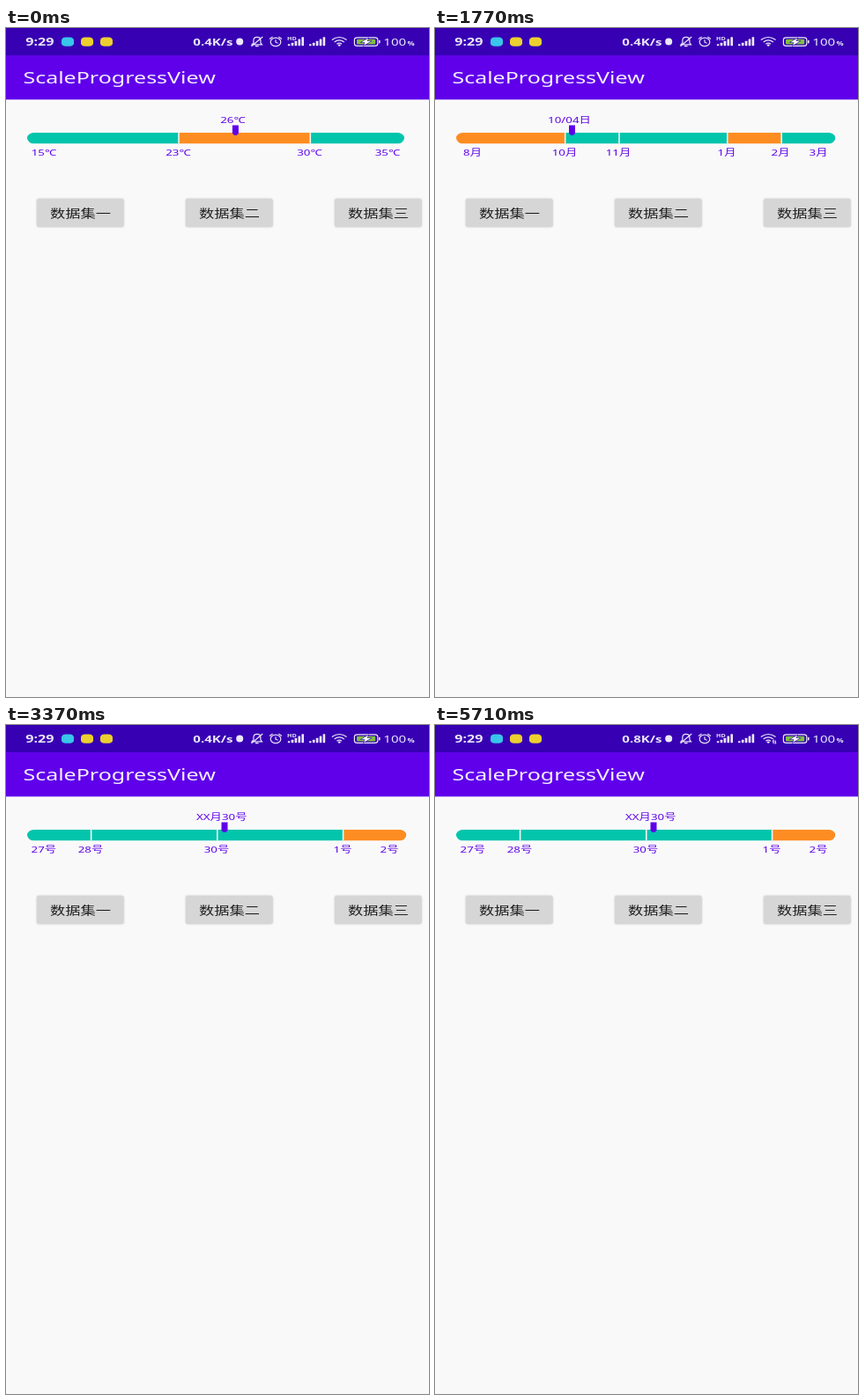
Animation of 480x760 px, one loop 5.75 s. Source, as an HTML page:

```html
<!DOCTYPE html>
<html lang="zh-CN">
<head>
<meta charset="utf-8">
<title>Scale progress</title>
<style>
  html, body { margin: 0; width: 100%; height: 100%; overflow: hidden; background: #f9f9fa; }
  svg { display: block; }
  text { font-family: "Noto Sans", "Noto Sans CJK SC", "Noto Sans CJK", sans-serif; }
  .line { fill: none; stroke: #e9e4f8; stroke-width: 1.2; }
</style>
</head>
<body>
<svg id="stage" width="480" height="760" viewBox="0 0 480 760"></svg>
<script>
const LOOP = 5750;
const SQUEEZE = 1.368; // the 1080 x 2340 phone screen is shown wider than tall
const TEAL = '#03c5ac', ORANGE = '#fd8d22', VIOLET = '#5f00e9', PALE = '#ece8fa';
const NAMES = ['一', '二', '三'];
const BUTTON = { x: [35, 204, 373], y: 194, w: 98.5, h: 32 };

const rect = (x, y, w, h, fill, extra = '') =>
  `<rect x="${x}" y="${y}" width="${w}" height="${h}" fill="${fill}" ${extra}/>`;
const text = (str, x, y, size, fill, anchor = 'middle', weight = 400, extra = '') =>
  `<text transform="translate(${x} ${y}) scale(${SQUEEZE} 1)" font-size="${size}" fill="${fill}"
    text-anchor="${anchor}" font-weight="${weight}" ${extra}>${str}</text>`;
const line = (d, extra = '') => `<path class="line" d="${d}" ${extra}/>`;

// Each scale: right end, inner ticks, segment colours, labels with centres, thumb and its caption
const SCALES = [
  { end: 452, ticks: [196, 345.3], fills: [TEAL, ORANGE, TEAL],
    labels: [['15℃', 43], ['23℃', 195.5], ['30℃', 344.5], ['35℃', 433]],
    thumb: 260.4, caption: '26℃', at: 257.5 },
  { end: 454.3, ticks: [147.7, 209, 331.8, 393.2], fills: [ORANGE, TEAL, TEAL, ORANGE, TEAL],
    labels: [['8月', 42.5], ['10月', 147], ['11月', 208], ['1月', 331], ['2月', 392], ['3月', 435]],
    thumb: 155.5, caption: '10/04日', at: 152.5 },
  { end: 454.3, ticks: [96.6, 239.8, 382.6], fills: [TEAL, TEAL, TEAL, ORANGE],
    labels: [['27号', 42.8], ['28号', 96], ['30号', 239], ['1号', 382], ['2号', 435]],
    thumb: 248, caption: 'XX月30号', at: 244.7 }
];

function drawScale(s, i) {
  const edges = [24, ...s.ticks, s.end];
  const bars = s.fills.map((f, k) => rect(edges[k], 118.7, edges[k + 1] - edges[k], 12.8, f)).join('');
  const ticks = s.ticks.map(x => rect(x - 0.8, 118.7, 1.6, 12.8, '#f4f4f6')).join('');
  const labels = s.labels.map(([str, x]) => text(str, x, 144.7, 9.75, VIOLET)).join('');
  return `<g class="scale">
    <clipPath id="bar${i}">${rect(24, 118.7, s.end - 24, 12.8, '#000', 'rx="8.6" ry="6.4"')}</clipPath>
    <g clip-path="url(#bar${i})">${bars}${ticks}</g>${labels}
    <path d="M${s.thumb - 3.5} 110.5h7v9.3l-2 2h-3l-2 -2z" fill="${VIOLET}"/>
    ${text(s.caption, s.at, 107.6, 9.75, VIOLET)}</g>`;
}

function drawButton(name, i) {
  const { y, w, h } = BUTTON, x = BUTTON.x[i];
  const box = (fill, extra) => rect(x, y, w, h, fill, `rx="2.4" ry="1.8" ${extra}`);
  return `<clipPath id="btn${i}">${box('#000', '')}</clipPath>
    ${box('#d6d6d7', 'class="face"')}
    <g clip-path="url(#btn${i})">${box('#000', 'class="tint" opacity="0"')}
    <ellipse class="ripple" cy="${y + h / 2}" opacity="0"/></g>
    ${text('数据集' + name, x + w / 2 + 0.3, 214.9, 12.6, '#1d1d1d', 'middle', 500)}`;
}

function signal(x) {
  return [2, 3.5, 5.5, 7.8, 10].map((h, k) => rect(x + k * 3.9, 20.2 - h, 2.6, h, PALE, 'rx=".6"')).join('');
}

function drawStatus() {
  const icons = [[63, '#38c6ea'], [85, '#ecd02f'], [107, '#ecd02f']]
    .map(([x, c]) => rect(x, 10.4, 14, 10.4, c, 'rx="4.6" ry="3.6"')).join('');
  return rect(0, 0, 480, 31, '#3700b3')
    + text('9:29', 22.3, 19.9, 11.8, PALE, 'start', 600) + icons
    + text('', 257.5, 19.8, 11, PALE, 'end', 600, 'id="speed"')
    + `<circle cx="265.2" cy="15.4" r="4" fill="${PALE}"/>`
    // muted bell
    + line('M279 18.8h11.5l-1.6 -2v-2.6c0 -5 -8 -5 -8 0v2.6zM283 20.6h3.6M278.5 20.8L291.3 10')
    // alarm clock
    + `<ellipse class="line" cx="306" cy="15.9" rx="5.8" ry="4.7"/>`
    + line('M306 13.2v3l2.6 1M299 12.4l3.6 -2.4M313 12.4l-3.6 -2.4')
    + signal(319.8) + rect(318.5, 9, 11, 5.4, '#3700b3')
    + text('HD', 319, 13.8, 5.2, PALE, 'start', 600)
    + signal(344)
    // wireless
    + line('M369.8 13.6Q378.2 7.4 386.6 13.6M372.6 16Q378.2 11.8 383.8 16M375.4 18.2Q378.2 16.2 381 18.2', 'stroke-width="1.6"')
    + `<ellipse cx="378.2" cy="19.6" rx="1.6" ry="1.1" fill="${PALE}"/>`
    + `<g id="traffic">${rect(382.5, 16.4, 6, 5, '#3700b3')}${line('M384 21v-3.4l-.9 1M386.2 17.4v3.4l.9 -1', 'stroke-width=".8"')}</g>`
    // battery
    + rect(395.4, 10.8, 26.4, 9.6, 'none', `rx="3.2" ry="2.4" stroke="${PALE}" stroke-width="1.2"`)
    + rect(398, 12.8, 21.2, 5.6, '#7fc241', 'rx="1"')
    + `<path d="M411 11.6l-7.6 4.6h4l-1.2 3.6l7.8 -4.8h-4.2z" fill="#fff" stroke="#3700b3" stroke-width="1.1" paint-order="stroke"/>`
    + rect(423, 13.8, 1.6, 3.6, PALE, 'rx=".7"')
    + text('100', 428.3, 19.9, 11, PALE, 'start', 500)
    + text('%', 455.4, 19.9, 6.6, PALE, 'start', 600);
}

const stage = document.getElementById('stage');
stage.innerHTML = rect(0, 0, 480, 760, '#f9f9fa') + drawStatus()
  + rect(0, 31, 480, 50.3, '#6000eb')
  + text('ScaleProgressView', 19.4, 63, 18.3, '#f6f0ff', 'start')
  + SCALES.map(drawScale).join('') + NAMES.map(drawButton).join('');

const all = sel => [...stage.querySelectorAll(sel)];
const scales = all('.scale'), faces = all('.face'), tints = all('.tint'), ripples = all('.ripple');
const speed = stage.querySelector('#speed'), traffic = stage.querySelector('#traffic');

const TAPS = [null, { down: 1070, up: 1270, x: 287 }, { down: 2590, up: 2770, x: 430 }];
const ramp = (t, start, length) => Math.min(1, Math.max(0, (t - start) / length));
const show = (el, on) => el.setAttribute('visibility', on ? 'visible' : 'hidden');

function press(t, tap, i) {
  const lift = tap ? ramp(t, tap.down, 100) - ramp(t, tap.up + 30, 110) : 0;
  faces[i].style.filter =
    `drop-shadow(0 ${0.7 + lift}px ${1 + 1.3 * lift}px rgba(0,0,0,${0.22 + 0.1 * lift}))`;
  if (!tap) return;
  const grow = 1 - (1 - ramp(t, tap.down, 225)) ** 3;
  const fade = 1 - ramp(t, tap.up + 30, 150);
  const mid = BUTTON.x[i] + BUTTON.w / 2;
  tints[i].setAttribute('opacity', 0.055 * ramp(t, tap.down, 90) * fade);
  ripples[i].setAttribute('cx', tap.x + (mid - tap.x) * grow);
  ripples[i].setAttribute('rx', 54 * grow);
  ripples[i].setAttribute('ry', 54 * grow / SQUEEZE);
  ripples[i].setAttribute('opacity', t < tap.down ? 0 : 0.085 * fade);
}

function frame(now) {
  const t = now % LOOP;
  const active = t < TAPS[1].up + 10 ? 0 : t < TAPS[2].up + 10 ? 1 : 2;
  scales.forEach((el, i) => show(el, i === active));
  TAPS.forEach((tap, i) => press(t, tap, i));
  speed.textContent = t < 4480 ? '0.4K/s' : '0.8K/s';
  show(traffic, t >= 3580);
  requestAnimationFrame(frame);
}
frame(0);
</script>
</body>
</html>
```
